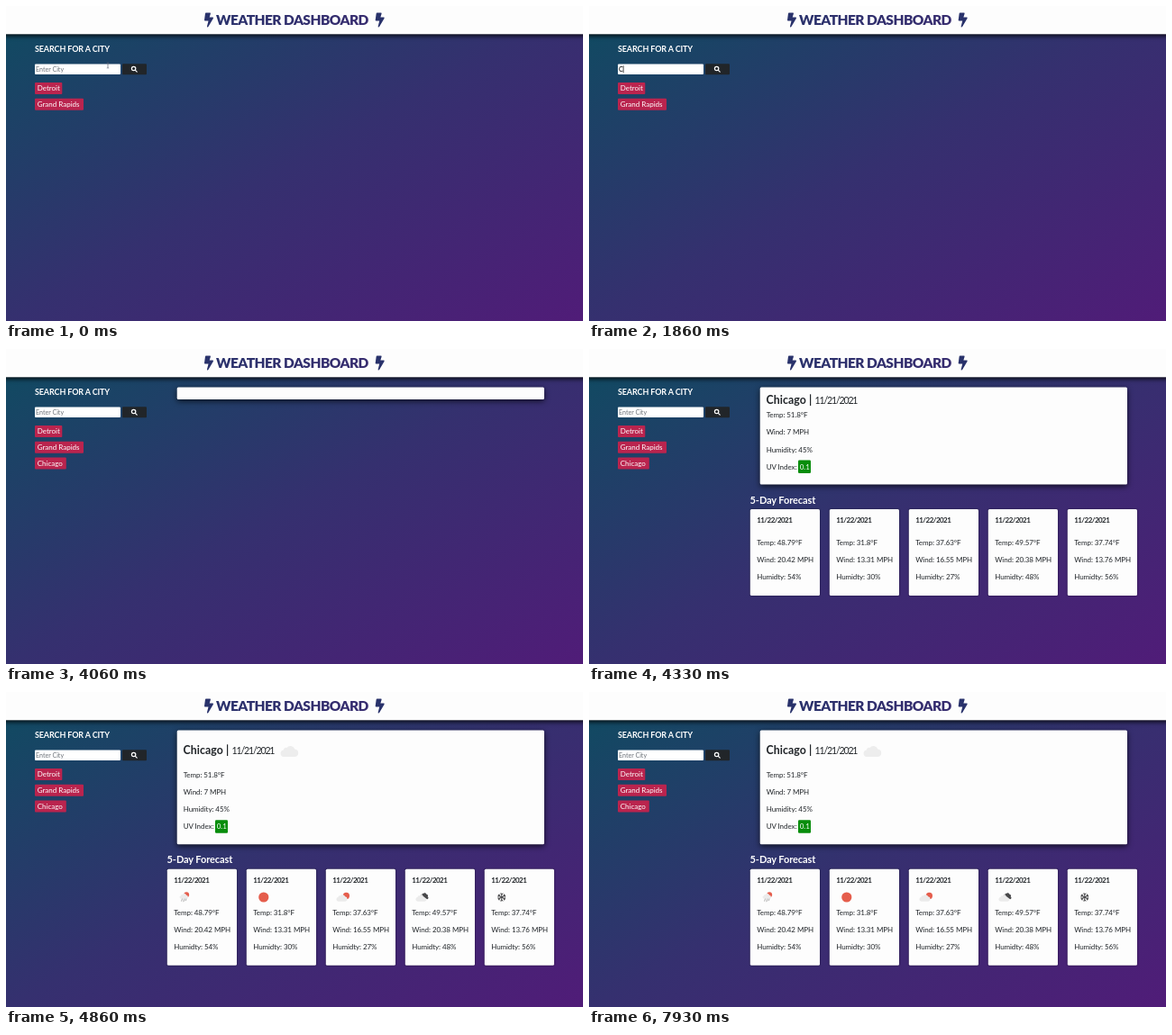
These frames come from a looping animation (640x350 px, 8000 ms). An HTML page:

```html
<!DOCTYPE html>
<html lang="en">
<head>
<meta charset="utf-8">
<title>Weather Dashboard</title>
<style>
  html, body { margin: 0; width: 100%; height: 100%; overflow: hidden; }
  body { background: linear-gradient(to bottom right, #0e4c61, #35306f 50%, #501c78); }
  svg { display: block; width: 640px; height: 350px; }
  text { font: 400 8px Lato, "Open Sans", sans-serif; fill: #212529; white-space: pre; }
  .light { fill: #fff; }
  .row { letter-spacing: -.08px; }
  .title { font-size: 15.5px; font-weight: 900; letter-spacing: -.55px; }
  .label { font-size: 9px; font-weight: 700; letter-spacing: -.12px; }
  .city { font-size: 12.3px; font-weight: 700; letter-spacing: .1px; }
  .date { font-size: 10.5px; letter-spacing: -1.15px; }
  .day { font-weight: 700; letter-spacing: -.55px; }
  .heading { font-size: 11px; font-weight: 700; letter-spacing: -.1px; }
  .field { font-size: 7.1px; }
  #typed { fill: #000; font-weight: 500; }
  #hint { fill: #6b7178; }
  .bar { fill: #fdfdfd; filter: drop-shadow(0 2px 2.5px rgba(0,0,0,.85)); }
  .panel { fill: #fdfdfd; filter: drop-shadow(0 2px 3px rgba(0,0,0,.7)); }
  .card { fill: #fdfdfd; filter: drop-shadow(0 0 1px rgba(0,0,0,.45)); }

  #pointer { animation: move 8s infinite; }
  #saved { animation: saved 8s step-end infinite; }
  #empty { animation: empty 8s step-end infinite; }
  #brief { animation: brief 8s step-end infinite; }
  #full { animation: full 8s step-end infinite; }
  @keyframes move {
    0%, .75% { transform: translate(113px, 66px); opacity: 1; animation-timing-function: ease-in-out; }
    6.625% { transform: translate(73px, 70.5px); opacity: 1; animation-timing-function: step-end; }
    20.75%, 100% { transform: translate(73px, 70.5px); opacity: 0; }
  }
  @keyframes saved { 0% { opacity: 0 } 48.25%, 100% { opacity: 1 } }
  @keyframes empty { 0% { opacity: 0 } 48.25% { opacity: 1 } 54.125%, 100% { opacity: 0 } }
  @keyframes brief { 0% { opacity: 0 } 54.125% { opacity: 1 } 60.75%, 100% { opacity: 0 } }
  @keyframes full { 0% { opacity: 0 } 60.75%, 100% { opacity: 1 } }
</style>
</head>
<body>
<svg viewBox="0 0 640 350">
  <defs>
    <linearGradient id="ink" gradientUnits="userSpaceOnUse" x1="220" x2="420" y1="0" y2="0">
      <stop stop-color="#29326b"/><stop offset="1" stop-color="#392c70"/>
    </linearGradient>
    <path id="bolt" d="M1.8 0H6.2Q7.2 0 6.9 1L5.7 5H9.2Q10.4 5.1 9.9 6.2L4.4 15.6Q3.8 16.3 3.1 15.9Q2.9 15.6 3 15.1L4.5 9H.8Q-.1 8.9 0 8.1L1 .7Q1.1 0 1.8 0Z"/>
    <path id="cloud" d="M4 13.5A4 4 0 0 1 3.6 5.6A3.3 3.3 0 0 1 7.4 3A5.3 5.3 0 0 1 16.6 4.6A4.5 4.5 0 0 1 17 13.5Z"/>
  </defs>

  <rect class="bar" x="-10" y="-10" width="660" height="41.3"/>
  <g fill="url(#ink)">
    <use href="#bolt" x="220" y="7.5"/>
    <text class="title" x="233" y="21" style="fill:url(#ink)">WEATHER DASHBOARD</text>
    <use href="#bolt" x="409.7" y="7.5"/>
  </g>

  <text class="label light" x="32" y="51.2">SEARCH FOR A CITY</text>
  <rect x="32" y="64.5" width="95" height="11.5" rx="1" fill="#fff"/>
  <text id="hint" class="field" x="33" y="72.9">Enter City</text>
  <text id="typed" class="field" x="33" y="72.9"></text>
  <rect id="caret" y="66.3" width=".7" height="8" fill="#000"/>
  <rect x="129" y="64.3" width="27" height="11.9" rx="1" fill="#212529"/>
  <g fill="none" stroke="#fff" stroke-width="1.2" stroke-linecap="round">
    <circle cx="141.6" cy="69.5" r="2.2"/><path d="M143.4 71.3L145.2 73.1"/>
  </g>
  <g id="history"></g>
  <g id="saved"></g>

  <rect id="empty" class="panel" x="189.7" y="42.5" width="407.3" height="13.5" rx="1.5"/>
  <g id="brief"></g>
  <g id="full"></g>

  <path id="pointer" d="M-1.2 -3H-.4L0 -2.5L.4 -3H1.2M0 -2.5V2.5M-1.2 3H-.4L0 2.5L.4 3H1.2" fill="none" stroke="#5c6474" stroke-width=".7"/>
</svg>
<script>
const el = id => document.getElementById(id);
const text = (x, y, str, cls = '') => `<text class="${cls}" x="${x}" y="${y}">${str}</text>`;
const box = (x, y, w, h, cls) => `<rect class="${cls}" x="${x}" y="${y}" width="${w}" height="${h}" rx="1.5"/>`;
const cloud = (x, y, scale, fill) =>
  `<use href="#cloud" transform="translate(${x} ${y}) scale(${scale})" fill="${fill}"/>`;
const disc = (x, y, r) => `<circle cx="${x}" cy="${y}" r="${r}" fill="#e55d4c"/>`;

const tag = (y, w, name) =>
  `<rect x="32" y="${y}" width="${w}" height="13" rx="1" fill="#ba244e"/>` + text(34.7, y + 9.2, name, 'light');

// Weather icons, drawn around their centre
const flake = [0, 60, 120, 180, 240, 300].map(a =>
  `<path transform="rotate(${a})" d="M0 0V-4.6M-1.5 -4.2L0 -2.8L1.5 -4.2"/>`).join('');
const icons = [
  disc(2.4, -2.8, 2.9) + cloud(-5.4, -4.4, .46, '#ececec') +
    '<path d="M-2.2 1.6L-3.2 4.6M.2 1.6L-1 5.2M2.2 1.6L1.4 4" stroke="#777" stroke-width=".6"/>',
  disc(0, 0, 5.6),
  disc(3.6, -1.6, 3.6) + cloud(-7.6, -3.4, .6, '#ebebeb'),
  cloud(-2, -5.2, .4, '#48484a') + cloud(-7.6, -3.4, .6, '#ebebeb') +
    '<path d="M1.6 -2.2L5.4 .8" stroke="#48484a" stroke-width="2.6" stroke-linecap="round"/>',
  `<g fill="none" stroke="#48484a" stroke-width="1">${flake}</g>`
];
const days = [[48.79, 20.42, 54], [31.8, 13.31, 30], [37.63, 16.55, 27], [49.57, 20.38, 48], [37.74, 13.76, 56]];

function rows(x, y, lines) {
  return lines.map((line, i) => text(x, y + i * 19.1, line, 'row')).join('');
}

function report(tall) {
  const drop = tall ? 18.7 : 0;
  const top = 178 + drop;
  const gap = tall ? 11 : 0;
  const head = tall ? 69 : 61;
  let out = box(189.7, 42.5, 407.3, 108 + drop, 'panel')
    + text(196.5, head, 'Chicago |', 'city')
    + text(250.6, head, '11/21/2021', 'date')
    + rows(196.7, 76.3 + drop, ['Temp: 51.8°F', 'Wind: 7 MPH', 'Humidity: 45%', 'UV Index:'])
    + `<rect x="232" y="${123.6 + drop}" width="14" height="14.4" rx="1.2" fill="#078d0b"/>`
    + text(233.8, 133.6 + drop, '0.1', 'light row')
    + text(178.6, 171.7 + drop, '5-Day Forecast', 'heading light');
  if (tall) out += cloud(304.2, 59, .97, '#ededed');
  days.forEach(([temp, wind, wet], i) => {
    const x = 178.8 + i * 88;
    out += box(x, top, 77.2, 96 + gap, 'card')
      + text(x + 7.4, top + 14.8, '11/22/2021', 'day')
      + rows(x + 7.4, top + 40 + gap, [`Temp: ${temp}°F`, `Wind: ${wind} MPH`, `Humidty: ${wet}%`]);
    if (tall) out += `<g transform="translate(${x + 19} 228)">${icons[i]}</g>`;
  });
  return out;
}

el('history').innerHTML = tag(85, 30.3, 'Detroit') + tag(102.7, 54, 'Grand Rapids');
el('saved').innerHTML = tag(120.5, 34.8, 'Chicago');
el('brief').innerHTML = report(false);
el('full').innerHTML = report(true);

// Typing with a correction; '<' deletes a letter and '!' submits
const keys = [[1660, 'C'], [1860, 'h'], [1930, 'i'], [2000, 'c'], [2200, 'a'], [2460, 'h'], [2860, 'o'],
  [2930, '<'], [3000, '<'], [3060, 'g'], [3200, 'o'], [3860, '!']];
const clock = el('pointer').getAnimations()[0];

function frame() {
  const t = (clock.currentTime || 0) % 8000;
  let word = '';
  for (const [at, key] of keys) {
    if (t < at) break;
    word = key === '!' ? '' : key === '<' ? word.slice(0, -1) : word + key;
  }
  const typed = el('typed');
  typed.textContent = word;
  el('hint').style.opacity = word ? 0 : 1;
  el('caret').style.opacity = word || (t >= 860 && t < 1200) ? 1 : 0;
  el('caret').setAttribute('x', 33 + (word ? typed.getComputedTextLength() : 0));
  requestAnimationFrame(frame);
}
frame();
</script>
</body>
</html>
```
